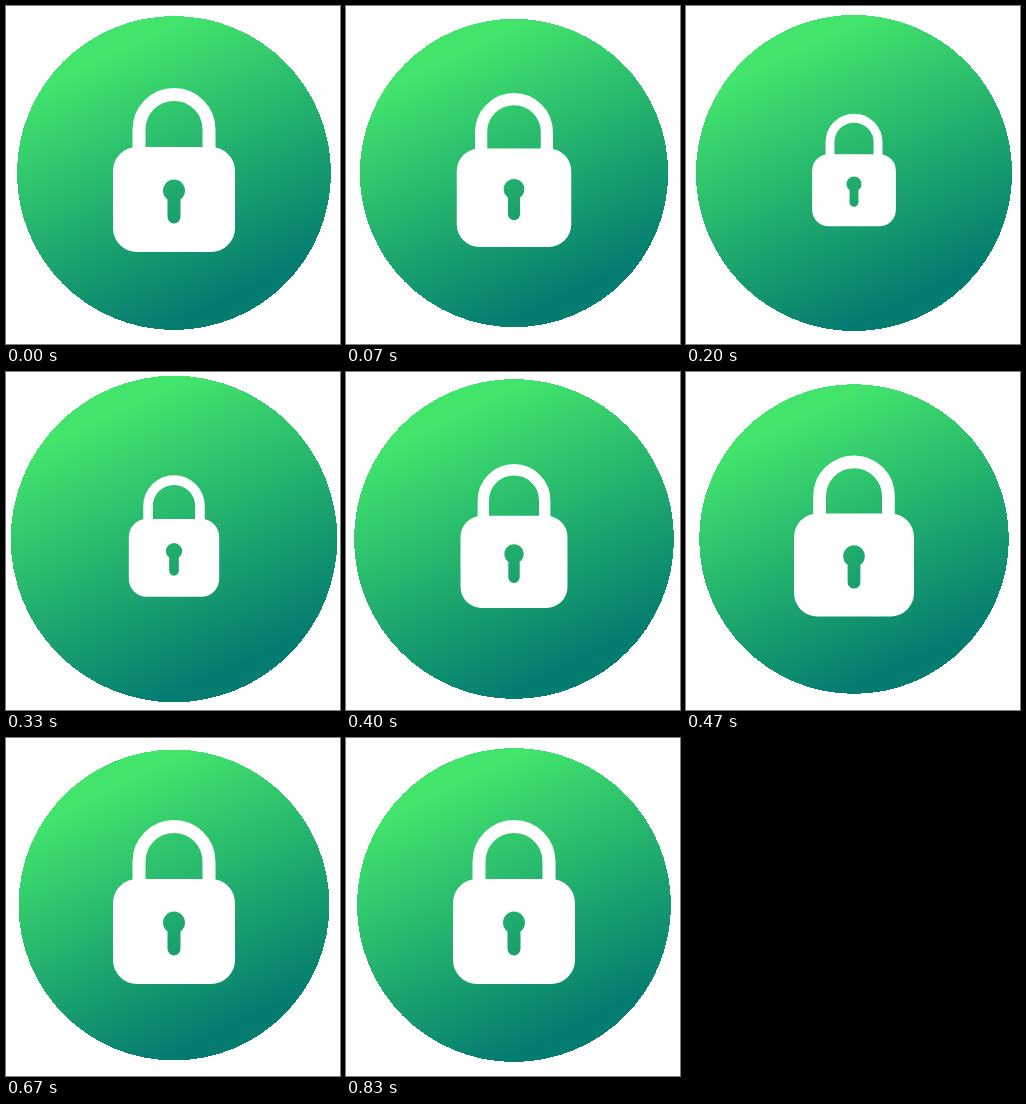
Animation, 334 px wide and 338 px high, one loop 1.21 s. Source, as an HTML page:

```html
<!DOCTYPE html>
<html>
<head>
<meta charset="utf-8">
<title>Padlock pulse</title>
<style>
html, body { margin: 0; width: 100%; height: 100%; overflow: hidden; background: #fff; }
svg { display: block; width: 334px; height: 338px; }
</style>
</head>
<body>
<svg viewBox="0 0 334 338">
  <defs>
    <linearGradient id="green" gradientUnits="userSpaceOnUse" x1="110" y1="46" x2="226" y2="290">
      <stop offset="0" stop-color="#42e46c"/>
      <stop offset="1" stop-color="#047c70"/>
    </linearGradient>
  </defs>
  <circle id="disc" cx="168" cy="167" r="157" fill="url(#green)" shape-rendering="crispEdges"/>
  <g id="lock" fill="#fff">
    <path d="M133 146V123.5a35 35 0 0 1 70 0V146" fill="none" stroke="#fff" stroke-width="13"/>
    <path fill-rule="evenodd" d="M131 141H205a24 24 0 0 1 24 24V222a24 24 0 0 1-24 24H131a24 24 0 0 1-24-24V165a24 24 0 0 1 24-24Z
      M161.5 193.4A11 11 0 1 1 174.5 193.4V211A6.5 6.5 0 0 1 161.5 211Z"/>
  </g>
</svg>
<script>
const LOOP = 1210;
// [step, scale] keys at 30 steps per second
const discKeys = [[0, 1], [2.5, .98], [10, 1.04], [15, .98], [25, 1]];
const lockKeys = [[0, 1], [7.5, .65], [15, 1]];
const disc = document.getElementById('disc');
const lock = document.getElementById('lock');

function scaleAt(keys, step) {
  const i = keys.findIndex(k => k[0] > step);
  if (i < 0) return keys[keys.length - 1][1];
  const [s0, v0] = keys[i - 1], [s1, v1] = keys[i];
  const x = (step - s0) / (s1 - s0);
  return v0 + (v1 - v0) * x * x * (3 - 2 * x);
}

function zoom(el, y, s) {
  el.setAttribute('transform', `translate(168 ${y}) scale(${s}) translate(-168 ${-y})`);
}

function draw(now) {
  const t = now % LOOP;
  // whole steps, each starting on a multiple of 10 ms
  const step = Math.floor((Math.floor(t / 10) + .4) * .3);
  zoom(disc, 167, scaleAt(discKeys, step));
  zoom(lock, 164, scaleAt(lockKeys, step));
}

let start;
function tick(now) {
  start ??= now;
  draw(now - start);
  requestAnimationFrame(tick);
}
draw(0);
requestAnimationFrame(tick);
</script>
</body>
</html>
```
